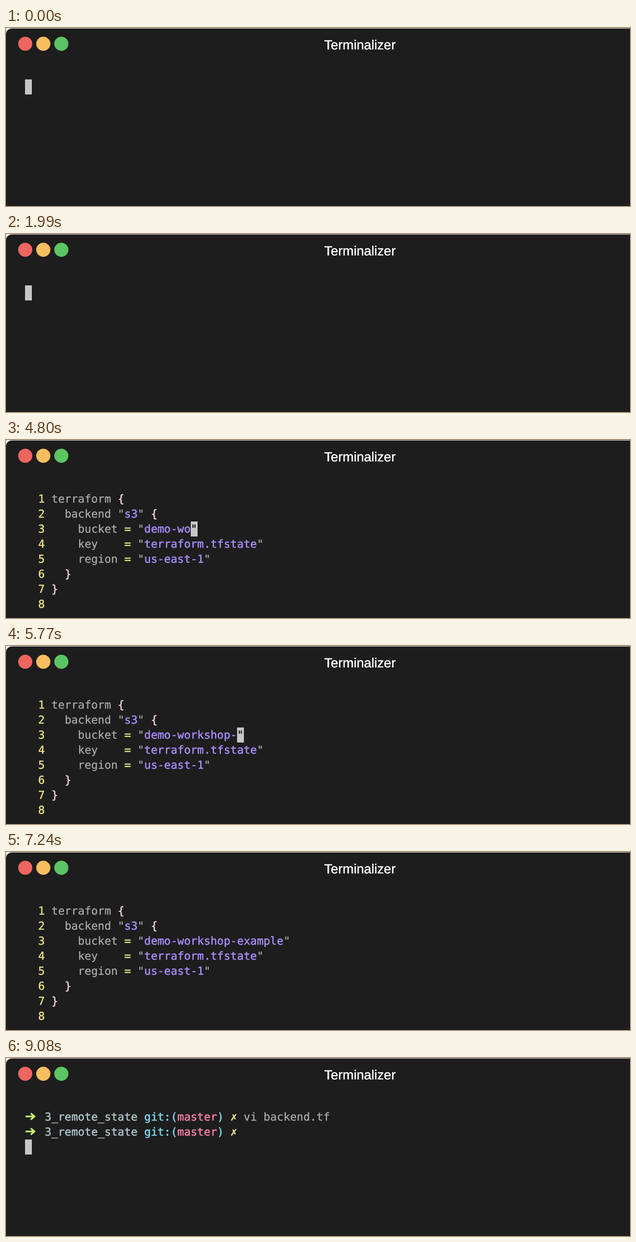
An HTML page for the animation above (9710 ms loop, 1280 by 367 pixels).

```html
<!DOCTYPE html>
<html lang="en">
<head>
<meta charset="utf-8">
<title>Terminal</title>
<style>
  html, body { margin: 0; width: 100%; height: 100%; overflow: hidden; background: #ececec; }
  #stage { position: relative; width: 100%; height: 100%; overflow: hidden; contain: strict; }
  #window {
    position: absolute; left: 0; top: 1px; right: 0; bottom: 0;
    background: #1d1d1d; border-radius: 12px 0 0 0;
  }
  .dot { position: absolute; top: 17px; width: 29px; height: 29px; border-radius: 50%; }
  #title {
    position: absolute; left: 626px; top: 13.6px; width: 200px; text-align: center;
    font: 27.2px/40px "Liberation Sans", Arial, sans-serif; color: #fff;
    text-rendering: geometricPrecision; -webkit-text-stroke: .5px currentColor;
  }
  #screen {
    position: absolute; left: 38.8px; top: 105px;
    font: 22.59px/32px "DejaVu Sans Mono", monospace;
    text-rendering: geometricPrecision; font-variant-ligatures: none;
    -webkit-text-stroke: .5px currentColor;
  }
  #screen span, #screen svg { position: absolute; white-space: pre; }
  #screen svg { fill: none; stroke: #c8ed71; stroke-width: 3.6; stroke-linejoin: round; stroke-linecap: round; }
  .plain { color: #afafaf; -webkit-text-stroke-width: .25px; }
  .yellow { color: #ebdf86; }
  .string { color: #a98ffc; }
  .brace { color: #ffd7d7; }
  .dir { color: #b1c6ca; }
  .git { color: #7eddf1; }
  .branch { color: #fa81a9; }
  #screen .cursor { width: 14.5px; height: 31px; background: #c7c7c7; color: #1d1d1d; }
</style>
</head>
<body>
<div id="stage">
  <div id="window">
    <div class="dot" style="left:25px;background:#ef6560"></div>
    <div class="dot" style="left:62px;background:#f8bd5f"></div>
    <div class="dot" style="left:99px;background:#5cc563"></div>
    <div id="title">Terminalizer</div>
    <div id="screen"></div>
  </div>
</div>
<script>
const LOOP = 9710, CELL = 13.6, ROW = 31;
const COMMAND = 'vi backend.tf ';
const BUCKET = 'demo-workshop-example';

// Moments at which each key lands
const commandKeys = [680, 760, 840, 920, 1090, 1160, 1230];
const bucketKeys = [
  4120, 4210, 4290, 4380, 4600, 4700, 4800, 4920, 5010, 5220, 5280,
  5460, 5530, 5770, 5890, 6050, 6190, 6290, 6520, 6600, 6680
];
const pressed = (keys, t) => keys.filter(k => k <= t).length;

const token = (row, col, text, style) => ({ row, col, text, style });

function prompt(row, typed = '') {
  return [
    token(row, 0, '➜', 'arrow'),
    token(row, 3, '3_remote_state', 'dir'),
    token(row, 18, 'git:(', 'git'),
    token(row, 23, 'master', 'branch'),
    token(row, 29, ')', 'git'),
    token(row, 31, '✗', 'yellow'),
    token(row, 33, typed, 'plain')
  ];
}

function styleOf(text, afterQuote) {
  if (afterQuote && text[0] !== '"') return 'string';
  if (text === '=') return 'yellow';
  return /[{}]/.test(text) ? 'brace' : 'plain';
}

function editor(bucket) {
  const lines = [
    'terraform {',
    '  backend "s3" {',
    `    bucket = "${bucket}"`,
    '    key    = "terraform.tfstate"',
    '    region = "us-east-1"',
    '  }',
    '}',
    ''
  ];
  return lines.flatMap((line, row) => [
    token(row, 2, String(row + 1), 'yellow'),
    ...[...line.matchAll(/(?<=")[\w.-]+(?=")|[{}=]|"+|\w+/g)].map(m =>
      token(row, m.index + 4, m[0], styleOf(m[0], line[m.index - 1] === '"')))
  ]);
}

function editorCursor(t, count) {
  if (t >= 7240) return null;
  if (t >= 6970) return [2, 17 + count];
  if (t >= 3160) return [2, 18 + count];
  if (t >= 2990) return [2, 19];
  if (t >= 2760) return [2, 4];
  return [t >= 2610 ? 1 : 0, 4];
}

function view(t) {
  if (t < 20) return { tokens: [], cursor: [0, 0] };
  if (t < 1990) {
    const typed = t >= 1410 ? COMMAND : COMMAND.slice(0, pressed(commandKeys, t));
    return { tokens: prompt(0, typed), cursor: t >= 1830 ? [1, 0] : [0, 33 + typed.length] };
  }
  if (t < 2090) return { tokens: [], cursor: [0, 0] };
  if (t < 7980) {
    const count = pressed(bucketKeys, t);
    return { tokens: editor(BUCKET.slice(0, count)), cursor: editorCursor(t, count) };
  }
  const tokens = prompt(0, COMMAND);
  if (t < 8010) return { tokens, cursor: [1, 0] };
  return { tokens: [...tokens, ...prompt(1)], cursor: t < 9080 ? [1, 33] : [2, 0] };
}

const place = (row, col) => `style="left:${(col * CELL).toFixed(2)}px;top:${row * ROW}px"`;

function draw({ row, col, text, style }) {
  if (style === 'arrow') {
    return `<svg ${place(row, col)} width="24" height="31"><path d="M2.5 14.5H18M13 9L19.5 14.5L13 20"/></svg>`;
  }
  return `<span class="${style}" ${place(row, col)}>${text}</span>`;
}

function drawCursor(tokens, [row, col]) {
  const under = tokens.find(k => k.row === row && k.col <= col && col < k.col + k.text.length);
  const char = under ? under.text[col - under.col] : '';
  return `<span class="cursor" ${place(row, col)}>${char}</span>`;
}

const screenBox = document.getElementById('screen');
const start = performance.now();
let shown = null;

function tick() {
  const { tokens, cursor } = view((performance.now() - start) % LOOP);
  const html = tokens.map(draw).join('') + (cursor ? drawCursor(tokens, cursor) : '');
  if (html !== shown) screenBox.innerHTML = shown = html;
  requestAnimationFrame(tick);
}
tick();
</script>
</body>
</html>
```
